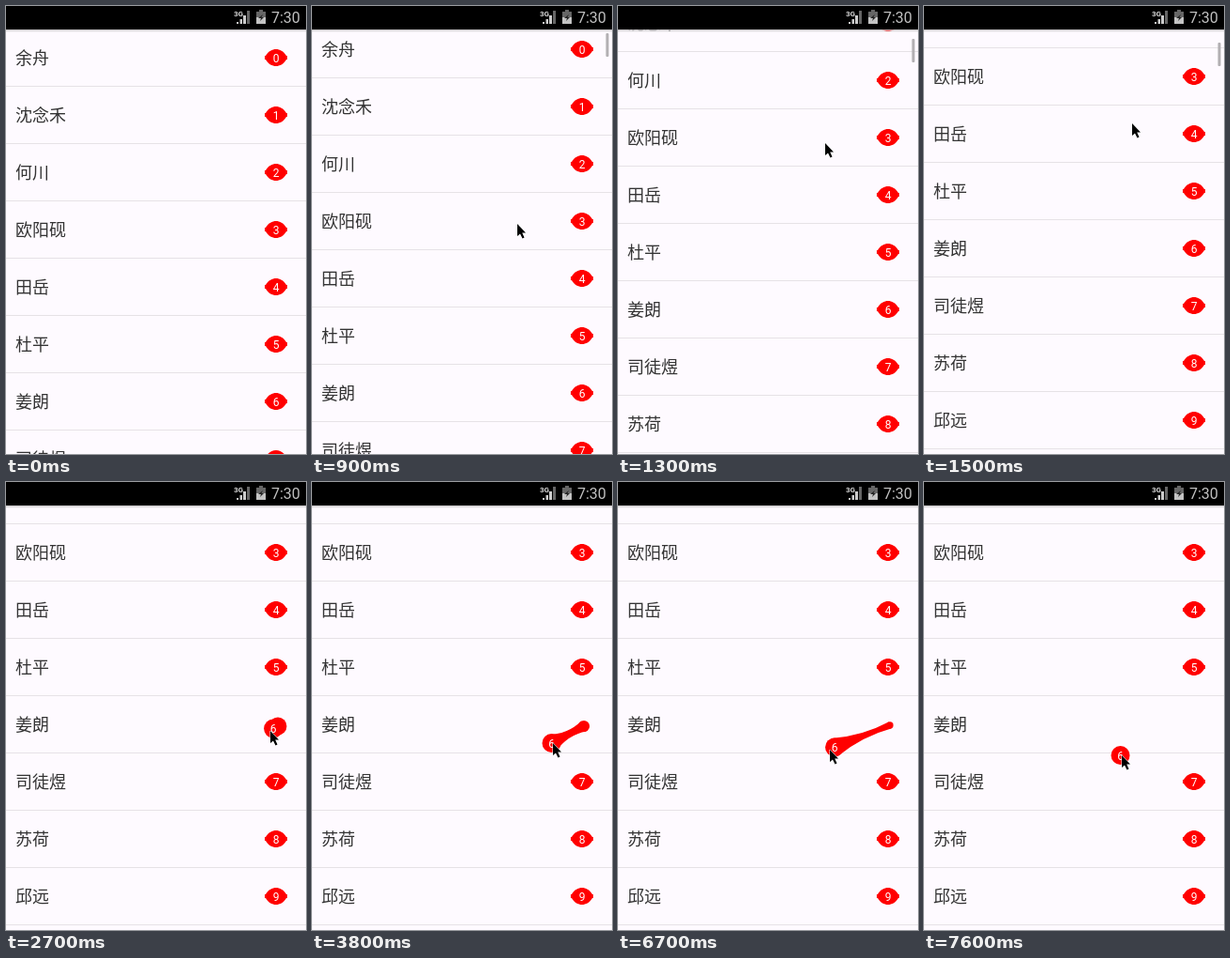
An HTML page for the animation above (8 s loop, 320 px wide and 477 px high).

```html
<!DOCTYPE html>
<html lang="zh-CN">
<head>
<meta charset="utf-8">
<title>Draggable badges</title>
<style>
  html, body { margin: 0; width: 100%; height: 100%; overflow: hidden; background: #fefaff; }
  svg { display: block; width: 320px; height: 477px; }
  .name { font: 18px "Noto Sans CJK SC", "Noto Sans CJK", sans-serif; fill: #333; }
  .count { font: 12px Roboto, sans-serif; fill: #fff; text-anchor: middle; }
  .clock { font: 16px Roboto, sans-serif; fill: #c0c0c0; }
  .net { font: bold 8px Roboto, sans-serif; fill: #ddd; }
  .red { fill: #f00; }
</style>
</head>
<body>
<svg viewBox="0 0 320 477">
  <defs>
    <linearGradient id="shade" x2="0" y2="1">
      <stop stop-color="#c4c2c4"/>
      <stop offset="1" stop-color="#c4c2c4" stop-opacity="0"/>
    </linearGradient>
    <path id="lens" class="red" d="M-12-2H-11C-8-7-4-9 0-9S8-7 11-2H12V2H11C8 7 4 9 0 9S-8 7-11 2H-12Z"/>
  </defs>
  <rect width="320" height="477" fill="#fefaff"/>
  <g id="list"></g>
  <rect id="thumb" x="313.5" width="3" height="25" rx="1" fill="#b2afb2"/>

  <rect y="25" width="320" height="3" fill="url(#shade)"/>
  <rect width="320" height="25"/>
  <text class="net" x="243" y="11">3G</text>
  <path d="M246 17h2v2h-2zM249.500 14h2.500v5h-2.500zM253 10h3v9h-3z" fill="#ccc"/>
  <path d="M257 5h3v14h-3z" fill="#666"/>
  <path d="M270 4h4v2h3v6h-10v-6h3z" fill="#666"/>
  <path d="M267 12h10v7h-10z" fill="#c4c4c4"/>
  <path d="M274 9l-5 4h3l-1 3 4-4h-2.500z" fill="#222"/>
  <text class="clock" x="283" y="18">7:30</text>

  <g id="drag">
    <path id="neck" class="red"/>
    <circle id="anchor" class="red"/>
    <g id="ball">
      <circle class="red" r="10"/>
      <text class="count" y="4.500">6</text>
    </g>
  </g>
  <path id="cursor" d="M0 0V13L3 10.500 5.500 15.500 7.500 14.500 5.200 9.500H9Z"
    stroke="#fff" paint-order="stroke"/>
</svg>
<script>
  const LOOP = 8000, STEP = 100, ROW = 61, ROWS = 108, VIEW = 452, TOP = 25;
  const RADIUS = 10, SNAP = 70, HELD = 6, SCROLL = 163;
  const names = ['余舟', '沈念禾', '何川', '欧阳砚', '田岳', '杜平', '姜朗', '司徒煜', '苏荷', '邱远'];

  // The pointer enters here and glides through its moves at even speed.
  const entry = { x: 288, y: 107 };
  const moves = [
    { from: 100, to: 500, x: 217, y: 296 },
    { from: 600, to: 1400, x: 222, y: 125 },
    { from: 1500, to: 2400, x: 291.5, y: 260 },
    { from: 2500, to: 3200, x: 257, y: 278 },
    { from: 4400, to: 4900, x: 294, y: 253 },
    { from: 4900, to: 5300, x: 305, y: 267 },
    { from: 5300, to: 5500, x: 291.5, y: 259 },
    { from: 5700, to: 6700, x: 226, y: 285 },
    { from: 6700, to: 7500, x: 211, y: 291 }
  ];
  const drags = [{ from: 2600, to: 5000 }, { from: 5800, to: LOOP }];

  const $ = id => document.getElementById(id);
  const show = (el, on) => el.style.display = on ? '' : 'none';
  const place = (el, x, y) => el.setAttribute('transform', `translate(${x} ${y})`);
  const progress = (t, from, to) => Math.min(1, Math.max(0, (t - from) / (to - from)));

  const pointer = t => moves.reduce((p, m) => {
    const f = progress(t, m.from, m.to);
    return { x: p.x + (m.x - p.x) * f, y: p.y + (m.y - p.y) * f };
  }, entry);

  // The ball trails the pointer by one step.
  const trail = t => {
    const { x, y } = pointer(t - STEP);
    return { x: x - 1.5, y };
  };

  // Two curves pinched at the midpoint join the circles.
  function neckPath(a, ra, b, rb) {
    const d = Math.hypot(b.x - a.x, b.y - a.y) || 1;
    const nx = (a.y - b.y) / d, ny = (b.x - a.x) / d;
    const mid = `${(a.x + b.x) / 2} ${(a.y + b.y) / 2}`;
    const at = (p, r) => `${p.x + nx * r} ${p.y + ny * r}`;
    return `M${at(a, ra)}Q${mid} ${at(b, rb)}L${at(b, -rb)}Q${mid} ${at(a, -ra)}Z`;
  }

  $('list').innerHTML = names.map((name, i) => `
    <g transform="translate(0 ${TOP + i * ROW})">
      <text class="name" x="10" y="37">${name}</text>
      <g id="badge${i}" transform="translate(288 30)">
        <use href="#lens"/><text class="count" y="4.500">${i}</text>
      </g>
      <rect y="60" width="320" height="1" fill="#e6e2e6"/>
    </g>`).join('');

  function drawScroll(t) {
    const offset = Math.round(SCROLL * progress(t, 800, 1500) ** 1.5);
    place($('list'), 0, -offset);
    $('thumb').setAttribute('y', Math.round(TOP + 3 + offset * VIEW / (ROW * ROWS)));
    $('thumb').style.opacity = t > 800 ? 1 - progress(t, 1800, 2100) : 0;
  }

  function drawDrag(t) {
    const drag = drags.find(d => t >= d.from && t < d.to);
    show($('drag'), drag);
    show($('badge' + HELD), !drag);
    if (!drag) return;

    const anchor = trail(drag.from), ball = trail(t);
    const dist = Math.hypot(ball.x - anchor.x, ball.y - anchor.y);
    const r = RADIUS - dist / 10, joined = dist < SNAP;
    place($('ball'), ball.x, ball.y);
    place($('anchor'), anchor.x, anchor.y);
    show($('neck'), joined);
    show($('anchor'), joined);
    $('anchor').setAttribute('r', r);
    $('neck').setAttribute('d', neckPath(anchor, r, ball, RADIUS));
  }

  function draw(time) {
    const t = Math.floor(time % LOOP / STEP) * STEP;
    const { x, y } = pointer(t);
    show($('cursor'), t >= moves[0].from);
    place($('cursor'), Math.round(x), Math.round(y));
    drawScroll(t);
    drawDrag(t);
  }

  const start = performance.now();
  (function tick() {
    draw(performance.now() - start);
    requestAnimationFrame(tick);
  })();
</script>
</body>
</html>
```
